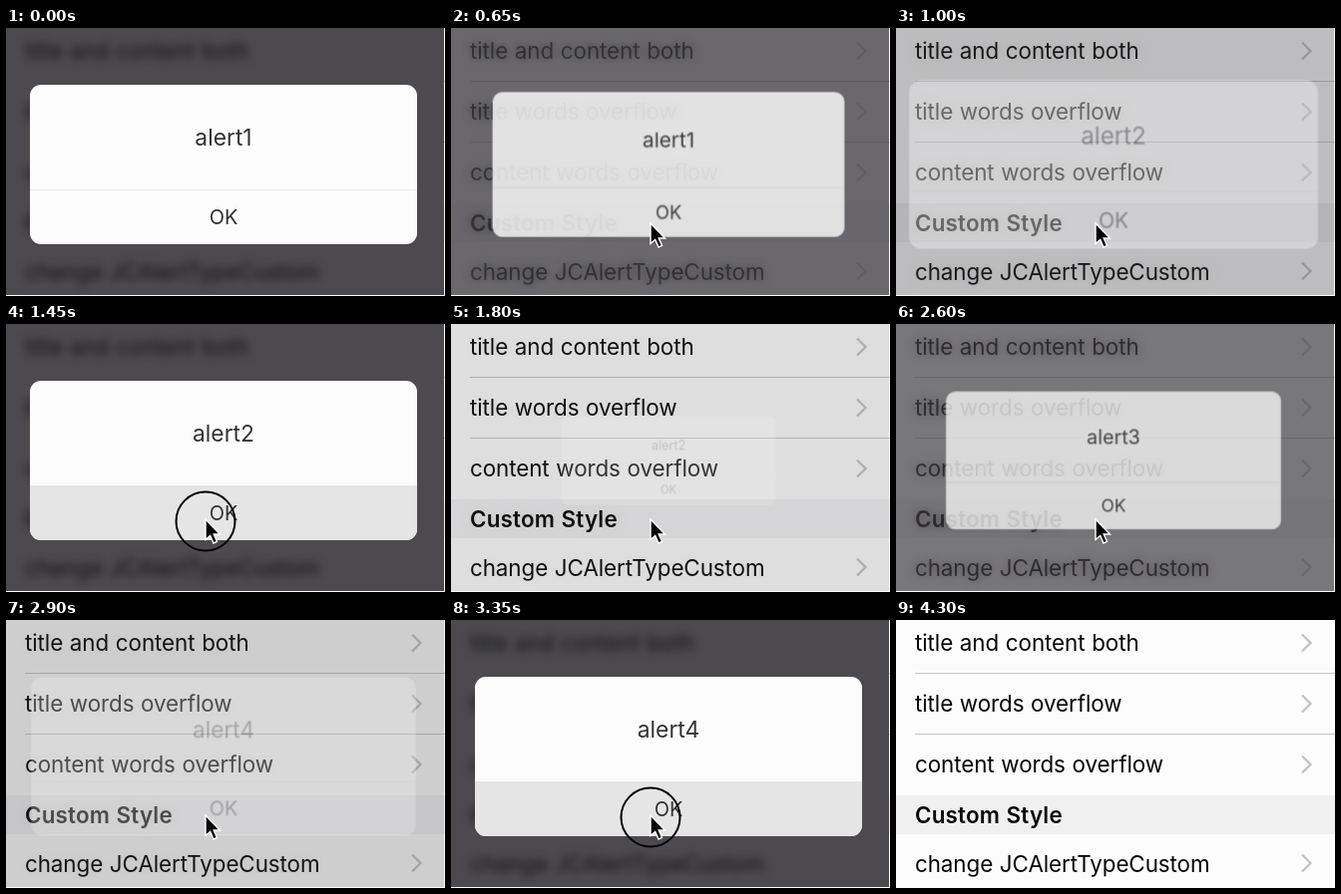
Animation of 440x269 px, one loop 4.8 s. Source, as an HTML page:

```html
<!DOCTYPE html>
<html lang="en">
<head>
<meta charset="utf-8">
<title>Alert queue</title>
<style>
html, body { margin: 0; width: 100%; height: 100%; overflow: hidden; background: #fcfcfc; }
svg { display: block; width: 100%; height: 100%; font: 22.4px Inter, "Liberation Sans", sans-serif; letter-spacing: -.08px; word-spacing: .5px; }
.heading { font-weight: 600; letter-spacing: .2px; }
.chevron { fill: none; stroke: #c2c2c6; stroke-width: 2.3; }
.line { fill: #c4c4c8; }
.blurred { filter: blur(4px); }
.veil, .dialog, .words text, .press, .cursor { animation: 4.8s linear infinite; }
.veil { animation-name: show; }
.dialog { animation-name: show, pop; transform-origin: 218px 137px; }
.dialog text { text-anchor: middle; letter-spacing: 0; fill: #333; }
.words text { opacity: 0; animation-name: word; animation-delay: var(--at); animation-timing-function: step-end; }
.press { animation-name: press; animation-timing-function: step-end; }
.cursor { animation-name: point; }

/* dialog and dimmed backdrop fade together */
@keyframes show {
  0%, 12.71% { opacity: 1; }
  17.71%, 18.27% { opacity: 0; }
  25.56%, 33.33% { opacity: 1; }
  38.33%, 39.63% { opacity: 0; }
  46.92%, 52.92% { opacity: 1; }
  57.92%, 58.58% { opacity: 0; }
  65.88%, 72.71% { opacity: 1; }
  77.08%, 100% { opacity: 0; }
}
/* overshoot on entry, shrink on exit */
@keyframes pop {
  0%, 12.71%, 25.56%, 33.33%, 46.92%, 52.92%, 65.88%, 72.71% { transform: scale(1); }
  17.71%, 18.27%, 38.33%, 39.63%, 57.92%, 58.58%, 77.08%, 100% { transform: scale(.47); }
  20.02%, 41.38%, 60.33% { transform: scale(.985); }
  20.9%, 42.25%, 61.21% { transform: scale(1.06); }
  21.92%, 43.27%, 62.23% { transform: scale(1.085); }
  24.47%, 45.82%, 64.78% { transform: scale(1.018); }
}
@keyframes word {
  0% { opacity: 1; }
  20%, 100% { opacity: 0; }
}
@keyframes press {
  0%, 12.71%, 33.33%, 52.92%, 72.71%, 100% { opacity: 0; }
  10.1%, 30.1%, 49.9%, 69.7% { opacity: 1; }
}
@keyframes point {
  0%, 1.9% { transform: translate(236px, 272px); animation-timing-function: ease-out; }
  9.4% { transform: translate(200px, 196px); animation-timing-function: step-end; }
  88.3% { transform: translate(177px, 159px); opacity: 1; animation-timing-function: step-end; }
  89.45%, 100% { transform: translate(177px, 159px); opacity: 0; }
}
</style>
</head>
<body>
<svg viewBox="0 0 440 269" preserveAspectRatio="none">
  <defs>
    <g id="rows">
      <text x="19" y="31.3">title and content both</text>
      <text x="19" y="92.3">title words overflow</text>
      <text x="19" y="153.3">content words overflow</text>
      <text x="19" y="204.2" class="heading">Custom Style</text>
      <text x="19" y="252.6">change JCAlertTypeCustom</text>
    </g>
    <path id="chevron" class="chevron" d="M407 -8.5L415.5 0L407 8.5"/>
  </defs>

  <rect width="440" height="269" fill="#fcfcfc"/>
  <rect y="176" width="440" height="39" fill="#f0f0f1"/>
  <rect class="line" x="19" y="53" width="421" height="1"/>
  <rect class="line" x="19" y="114" width="421" height="1"/>
  <use href="#rows" fill="#060606"/>
  <use href="#chevron" y="23"/>
  <use href="#chevron" y="84"/>
  <use href="#chevron" y="145"/>
  <use href="#chevron" y="244"/>

  <g class="veil">
    <rect width="439" height="268" fill="#4c4a4e"/>
    <use class="blurred" href="#rows" fill="#131215"/>
  </g>

  <g class="dialog">
    <rect x="24" y="57" width="388" height="160" rx="11" fill="#fcfcfc"/>
    <rect x="24" y="162" width="388" height="1" fill="#e9e9e9"/>
    <path class="press" d="M24 162H412V206a11 11 0 0 1 -11 11H35a11 11 0 0 1 -11 -11Z" fill="#e5e5e5"/>
    <g class="words" font-size="22.8">
      <text x="218" y="118" style="--at:-.1s">alert1</text>
      <text x="218" y="118" style="--at:-3.93s">alert2</text>
      <text x="218" y="118" style="--at:-2.95s">alert3</text>
      <text x="218" y="118" style="--at:-1.99s">alert4</text>
    </g>
    <text x="218" y="197" font-size="20">OK</text>
  </g>

  <circle class="press" cx="200" cy="198" r="29.5" fill="none" stroke="#000" stroke-width="2"/>
  <path class="cursor" d="M0 0V20.5L4.7 16.3L8 24L11.5 22.5L8.2 15H14.5Z" stroke="#fff" stroke-width="1.4"/>
</svg>
</body>
</html>
```
